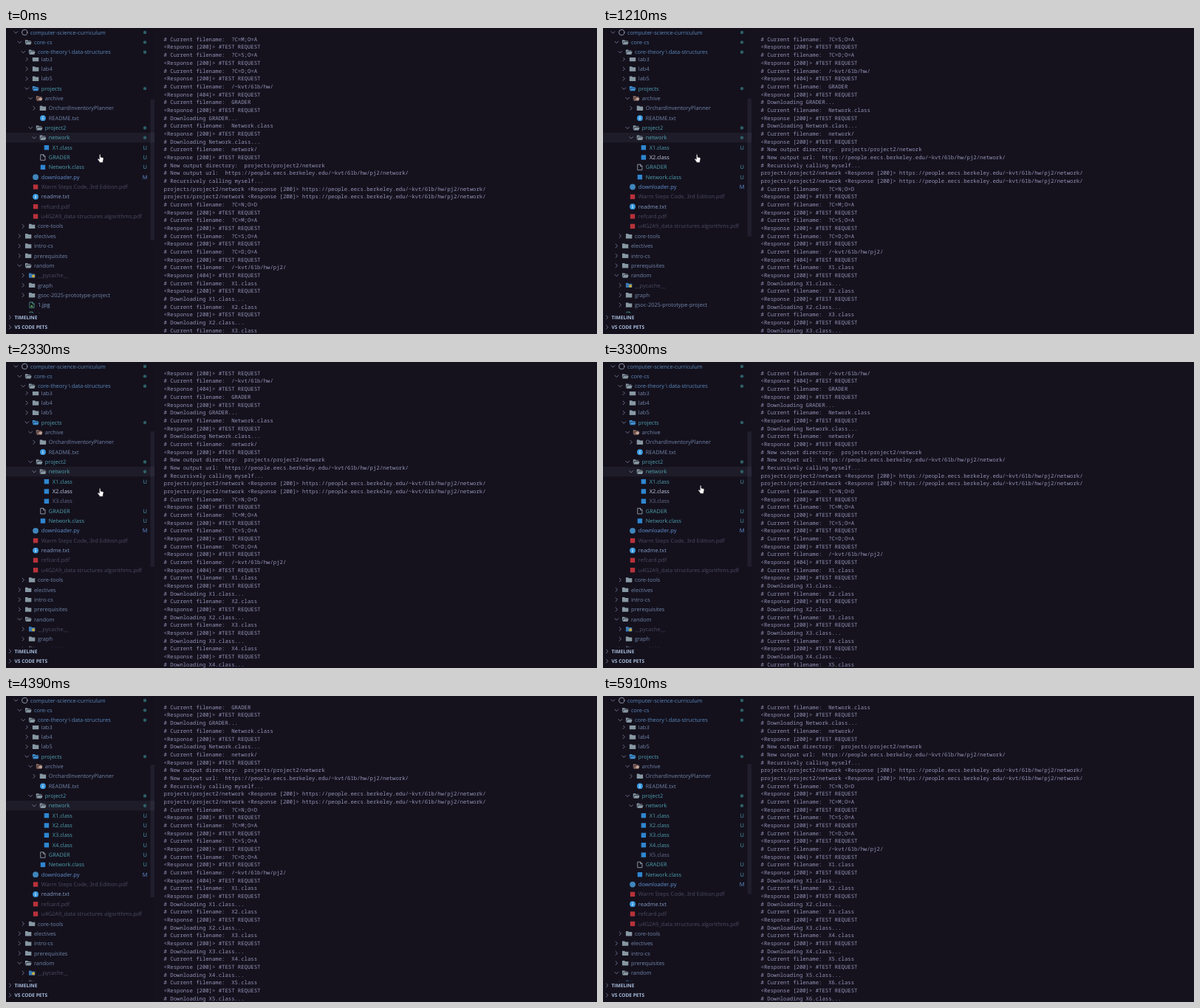
These frames come from a looping animation (800x415 px, 5940 ms). An HTML page:

```html
<!DOCTYPE html>
<html lang="en">
<head>
<meta charset="utf-8">
<title>Recursive downloader</title>
<style>
  html, body { margin: 0; width: 100%; height: 100%; overflow: hidden; background: #15121e; }
  svg { display: block; }
  text { white-space: pre; text-rendering: geometricPrecision; }
  .ui { font: 7.45px "Open Sans", "Noto Sans", sans-serif; }
  .head { font: bold 6.6px "Open Sans", "Noto Sans", sans-serif; }
  .mono { font: 7.28px "Noto Sans Mono", "DejaVu Sans Mono", monospace; fill: #9593b6; }
  .line { fill: none; stroke-width: 0.8; stroke-linecap: round; stroke-linejoin: round; }
</style>
</head>
<body>
<svg width="800" height="415" viewBox="0 0 800 415">
  <defs>
    <clipPath id="list"><rect x="0" y="40" width="201" height="346.5"/></clipPath>
  </defs>
  <rect width="800" height="415" fill="#15121e"/>
  <rect width="201" height="415" fill="#14111d"/>
  <g id="tree" clip-path="url(#list)"></g>
  <g id="sticky"></g>
  <rect id="thumb" x="195.5" width="5.5" fill="#8a90b8" opacity="0.1"/>
  <g id="term"></g>
  <g id="hand">
    <path d="M-1.7 -5.3Q-.8 -6.2 0 -5.3V-1.9L3.2 -1.2Q4.2 -.8 4 .5L3.2 4.1V5.5H-1.5V4.4L-4 1.2Q-4.3 0 -3 .1L-1.7 1.2Z"
      fill="#fff" stroke="#15131c" stroke-width="0.6"/>
  </g>
</svg>
<script>
const LOOP = 5940;
const ROW = 13.34, LINE = 10.676, VISIBLE = 38;
const TEAL = '#4f9fae', BLUE = '#5b88ba', GRAY = '#7185a8', DIM = '#4b4b61', NEW = '#646b8c',
      PALE = '#8299c2', BRIGHT = '#c3cde6', FOLDER = '#8798a3';

// [time, lines scrolled]
const SCROLL = [[0, 0], [350, 2], [1270, 3], [1990, 5], [2910, 6], [3630, 8], [4550, 9], [5270, 11]];
// [time, class files listed]
const FILES = [[0, 1], [560, 2], [2200, 3], [3840, 4], [5500, 5]];
const TRACKED_AT = 4150, HOVER_END = 3700, DESELECT_AT = 5520;
// [time, x, y]
const POINTER = [[0, 128, 177], [2750, 128, 177], [3000, 133, 173], [3680, 133, 173], [4000, 140, -12]];

const $ = id => document.getElementById(id);
const esc = s => s.replace(/</g, '&lt;').replace(/>/g, '&gt;');
const label = (x, y, s, fill, cls = 'ui') =>
  `<text class="${cls}" x="${x}" y="${y + 2.6}" ${fill ? `fill="${fill}"` : ''}>${esc(s)}</text>`;
const path = (d, stroke) => `<path class="line" d="${d}" stroke="${stroke}"/>`;
const chevron = (x, y, open) =>
  path(open ? `M${x - 2.4} ${y - 1.2}l2.4 2.4l2.4 -2.4` : `M${x - 1.2} ${y - 2.4}l2.4 2.4l-2.4 2.4`, '#8088a4');
const at = (steps, t) => steps.filter(s => s[0] <= t).pop()[1];

const shut = c => (x, y) =>
  `<path d="M${x - 4.2} ${y - 3.2}h3.2l1 1h4.2v5.4h-8.4z" fill="${c}"/>`;
const opened = c => (x, y) =>
  `<path d="M${x - 4.2} ${y - 3.2}h3.2l1 1h3.4v1h-6l-1.2 3.6h-.4z" fill="${c}"/>` +
  `<path d="M${x - 2.2} ${y - .6}h6.8l-1.4 3.8h-6.8z" fill="${c}"/>`;
const square = c => (x, y) => `<rect x="${x - 3.2}" y="${y - 3.2}" width="6.4" height="6.4" fill="${c}"/>`;
const disc = c => (x, y) => `<circle cx="${x}" cy="${y}" r="3.9" fill="${c}"/>`;
const page = c => (x, y) => path(`M${x - 2.8} ${y - 3.8}h3.6l2.2 2.2v5.4h-5.8zM${x + .6} ${y - 3.6}v2.2h2.2`, c);

const ICONS = {
  '>': shut(FOLDER),
  'v': opened(FOLDER),
  work: opened('#3f8fd0'),
  box: (x, y) => opened('#8a6a60')(x, y) + `<circle cx="${x + 1.8}" cy="${y + .8}" r="2.1" fill="#c2a69b"/>`,
  cache: (x, y) => shut('#3a78b0')(x, y) + `<circle cx="${x + 2}" cy="${y + 1}" r="2" fill="#c9a93c"/>`,
  ring: (x, y) => `<circle class="line" cx="${x}" cy="${y}" r="3.7" stroke="#a9b3c8"/>`,
  info: (x, y) => disc('#3d9be0')(x, y) +
    `<path d="M${x - .5} ${y - .5}h1v2.6h-1zM${x - .5} ${y - 2.2}h1v1h-1z" fill="#fff"/>`,
  java: square('#2f86d0'),
  pdf: square('#b8323a'),
  py: disc('#3f86bd'),
  file: page('#a4b0bd'),
  image: (x, y) => page('#4f9d90')(x, y) + `<path d="M${x - 2} ${y + 2.6}l1.6 -2.6l2.2 2.6z" fill="#6fb54f"/>`
};
const OPEN = ['v', 'work', 'box', 'ring'], CLOSED = ['>', 'cache'];

// Each row: depth, icon, name, colour, mark
function drawRow([depth, icon, name, color, mark], y) {
  const x = 33 + 4.95 * depth;
  let out = ICONS[icon](x - 7.8, y) + label(x, y, name, color);
  if (OPEN.includes(icon)) out += chevron(x - 19.6, y, true);
  if (CLOSED.includes(icon)) out += chevron(x - 19.6, y, false);
  if (mark === '*') out += `<circle cx="188" cy="${y}" r="2.2" fill="#2d6068"/>`;
  else if (mark) out += label(mark === 'M' ? 184.8 : 185.6, y, mark, color);
  return out;
}

const STICKY = [
  [0, 'ring', 'computer-science-curriculum', BLUE, '*'],
  [1, 'v', 'core-cs', BLUE, '*'],
  [2, 'v', 'core-theory\u2009\\\u2009data-structures', BLUE, '*']
];
const ABOVE = [
  [3, '>', 'lab3', GRAY], [3, '>', 'lab4', GRAY], [3, '>', 'lab5', GRAY],
  [3, 'work', 'projects', TEAL, '*'],
  [4, 'box', 'archive', GRAY],
  [5, '>', 'OrchardInventoryPlanner', GRAY],
  [5, 'info', 'README.txt', GRAY],
  [4, 'v', 'project2', TEAL, '*'],
  [5, 'v', 'network', TEAL, '*']
];
const BELOW = [
  [5, 'file', 'GRADER', TEAL, 'U'],
  [5, 'java', 'Network.class', TEAL, 'U'],
  [3, 'py', 'downloader.py', '#6291cf', 'M'],
  [3, 'pdf', 'Warm Steps Code, 3rd Edition.pdf', DIM],
  [3, 'info', 'readme.txt', PALE],
  [3, 'pdf', 'refcard.pdf', DIM],
  [3, 'pdf', 'u4G2A9_data structures algorithms.pdf', DIM],
  [2, '>', 'core-tools', GRAY],
  [1, '>', 'electives', GRAY], [1, '>', 'intro-cs', GRAY], [1, '>', 'prerequisites', GRAY],
  [1, 'v', 'random', GRAY],
  [2, 'cache', '__pycache__', DIM],
  [2, '>', 'graph', GRAY],
  [2, '>', 'gsoc-2025-prototype-project', GRAY],
  [2, 'image', '1.jpg', PALE],
  [2, 'image', '2.jpg', PALE]
];

function drawTree(count, tracked, hover, selected) {
  const files = Array.from({ length: count }, (_, i) => {
    const known = i === 0 || (tracked && i < 4);
    const color = known ? TEAL : hover && i === 1 ? BRIGHT : NEW;
    return [6, 'java', `X${i + 1}.class`, color, known ? 'U' : ''];
  });
  const rows = [...ABOVE, ...files, ...BELOW];
  $('tree').innerHTML =
    (selected ? '<rect y="142" width="201" height="13.3" fill="#1e1c29"/>' : '') +
    rows.map((r, i) => drawRow(r, 42.1 + i * ROW)).join('');
  drawThumb(count);
}

// The thumb shrinks and rises as the list grows.
function drawThumb(count) {
  const top = 33, view = 353.5, scrolled = 118;
  const scale = view / (641 + count * ROW);
  $('thumb').setAttribute('y', top + scrolled * scale);
  $('thumb').setAttribute('height', view * scale);
}

function terminalLines() {
  const home = '/~kvt/61b/hw/';
  const url = `https://people.eecs.berkeley.edu${home}pj2/network/`;
  const dir = 'projects/project2/network';
  const lines = [];
  const visit = (name, code = 200) =>
    lines.push(`# Current filename:  ${name}`, `<Response [${code}]> #TEST REQUEST`);
  const fetchFile = name => { visit(name); lines.push(`# Downloading ${name}...`); };
  const sorts = keys => keys.forEach(k => visit(`?C=${k}`));

  sorts(['M;O=A', 'S;O=A', 'D;O=A']);
  visit(home, 404);
  fetchFile('GRADER');
  fetchFile('Network.class');
  visit('network/');
  lines.push(`# New output directory:  ${dir}`, `# New output url:  ${url}`, '# Recursively calling myself...');
  for (let i = 0; i < 2; i++) lines.push(`${dir} <Response [200]> ${url}`);
  sorts(['N;O=D', 'M;O=A', 'S;O=A', 'D;O=A']);
  visit(`${home}pj2/`, 404);
  for (let i = 1; i <= 6; i++) fetchFile(`X${i}.class`);
  return lines;
}
const LINES = terminalLines();

function drawTerminal(first) {
  $('term').innerHTML = LINES.slice(first, first + VISIBLE)
    .map((s, i) => label(213.6, 15.2 + i * LINE, s, '', 'mono')).join('');
}

function movePointer(t) {
  let i = POINTER.findIndex(p => p[0] > t);
  if (i < 0) i = POINTER.length - 1;
  const [t0, x0, y0] = POINTER[i - 1], [t1, x1, y1] = POINTER[i];
  const p = Math.min(1, (t - t0) / (t1 - t0)), e = p * p * (3 - 2 * p);
  $('hand').setAttribute('transform', `translate(${x0 + (x1 - x0) * e} ${y0 + (y1 - y0) * e})`);
}

$('sticky').innerHTML =
  STICKY.map((r, i) => drawRow(r, 6 + i * ROW)).join('') +
  ['TIMELINE', 'VS CODE PETS'].map((s, i) => {
    const y = 392.4 + i * 13.3;
    return chevron(5.6, y, false) + label(11.5, y, s, '#a9bddd', 'head');
  }).join('');

let treeKey, termKey;
const start = performance.now();
function tick(now) {
  const t = Math.max(0, now - start) % LOOP;
  const state = [at(FILES, t), t >= TRACKED_AT, t < HOVER_END, t < DESELECT_AT];
  const first = at(SCROLL, t);
  if (treeKey !== state.join()) { treeKey = state.join(); drawTree(...state); }
  if (termKey !== first) { termKey = first; drawTerminal(first); }
  movePointer(t);
  requestAnimationFrame(tick);
}
tick(start);
</script>
</body>
</html>
```
